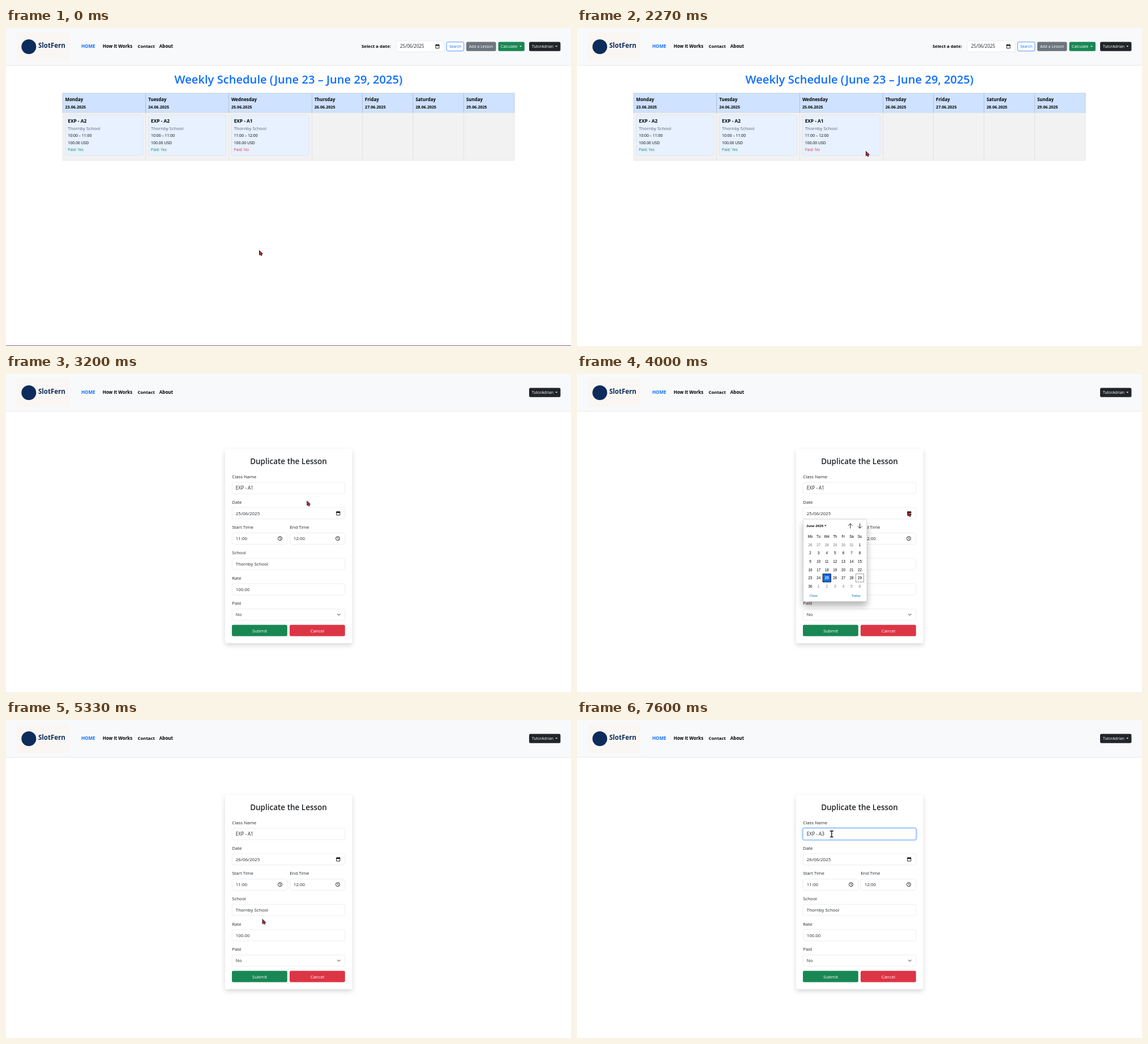
An HTML page that plays this animation: 998 px wide and 561 px high, repeating every 8000 ms.

```html
<!DOCTYPE html>
<html lang="en">
<head>
<meta charset="utf-8">
<title>Weekly schedule</title>
<style>
html, body { margin: 0; width: 100%; height: 100%; overflow: hidden; background: #fff; }
svg { display: block; width: 100%; height: 100%; }
text { font-family: "Open Sans", "Noto Sans", sans-serif; fill: #212529; white-space: pre; }
.b { font-weight: 700; }
.sb { font-weight: 600; }
.black { fill: #000; }
.white { fill: #fff; }
.blue { fill: #0d6efd; }
.grey { fill: #5a626b; }
.green { fill: #198754; }
.red { fill: #dc3545; }
.mid { text-anchor: middle; }
.field { fill: #fff; stroke: #dee2e6; stroke-width: .6; }
.icon { fill: none; stroke: #111; stroke-width: .9; }
#card { filter: drop-shadow(0 4.2px 4.2px rgba(0, 0, 0, .15)); }
#picker text { font-family: "Liberation Sans", Arial, sans-serif; }
#picker .out { fill: #777; }
#picker .link { fill: #0072d0; }
#panel { filter: drop-shadow(0 8px 6px rgba(0, 0, 0, .28)); }
#hint rect { filter: drop-shadow(0 .6px 1px rgba(0, 0, 0, .25)); }

.step { animation: 8s step-end infinite; }
.flow { animation: 8s linear infinite; }

#week, #tools { animation-name: week; }
@keyframes week { 0% { opacity: 1 } 32.44%, 100% { opacity: 0 } }
#edge { animation-name: edge; }
@keyframes edge { 0% { opacity: 1 } 15.81%, 100% { opacity: 0 } }
#menu { animation-name: menu; }
@keyframes menu { 0% { opacity: 0 } 15.81% { opacity: 1 } 28.31%, 100% { opacity: 0 } }
#pick { animation-name: pick; }
@keyframes pick { 0% { opacity: 0 } 19.5%, 100% { opacity: 1 } }

/* the page first lays out without the logo, then drops into place */
#form { animation-name: form; }
@keyframes form {
  0% { opacity: 0 }
  32.44% { opacity: 1; transform: translateY(-35.8px) }
  33.31%, 100% { opacity: 1; transform: none }
}
#bar { animation-name: bar; }
@keyframes bar { 0% { transform: none } 32.44% { transform: translateY(-35.8px) } 33.31%, 100% { transform: none } }
#links { animation-name: links; }
@keyframes links { 0% { transform: none } 32.44% { transform: translateY(-17.8px) } 33.31%, 100% { transform: none } }
#logo { animation-name: logo; }
@keyframes logo { 0% { opacity: 1 } 32.44% { opacity: 0 } 33.31%, 100% { opacity: 1 } }

#picker { animation-name: picker; }
@keyframes picker { 0% { opacity: 0 } 49.94% { opacity: 1 } 64.94%, 100% { opacity: 0 } }
#hover { animation-name: hover; }
@keyframes hover { 0% { opacity: 0 } 59% { opacity: 1 } 65%, 100% { opacity: 0 } }
#day1 { animation-name: before; }
#day2 { animation-name: after; }
@keyframes before { 0% { opacity: 1 } 64.94%, 100% { opacity: 0 } }
@keyframes after { 0% { opacity: 0 } 64.94%, 100% { opacity: 1 } }

#focus { animation-name: focus; }
@keyframes focus { 0%, 73.25% { opacity: 0 } 75%, 100% { opacity: 1 } }
#name1 { animation-name: name1; }
#name2 { animation-name: name2; }
#name3 { animation-name: name3; }
@keyframes name1 { 0% { opacity: 1 } 84.06%, 100% { opacity: 0 } }
@keyframes name2 { 0% { opacity: 0 } 84.06% { opacity: 1 } 88.31%, 100% { opacity: 0 } }
@keyframes name3 { 0% { opacity: 0 } 88.31%, 100% { opacity: 1 } }
#caret { animation-name: caret; }
@keyframes caret {
  0% { opacity: 0; transform: none }
  74.1% { opacity: 1; transform: none }
  80.8% { opacity: 0; transform: none }
  84.06% { opacity: 1; transform: translateX(-4.8px) }
  88.31% { opacity: 1; transform: none }
  94.94%, 100% { opacity: 0; transform: none }
}
#hint { animation-name: hint; }
@keyframes hint { 0%, 84.9% { opacity: 0 } 86.5%, 88.3% { opacity: 1 } 90.8%, 100% { opacity: 0 } }

#cursor { animation-name: move; }
@keyframes move {
  0% { transform: translate(447px, 392px); animation-timing-function: cubic-bezier(.35, .1, .45, 1) }
  10.875% { transform: translate(473px, 212px) }
  12.5% { transform: translate(471px, 204px) }
  14.125% { transform: translate(471px, 197px) }
  15% { transform: translate(471px, 197px); animation-timing-function: ease-in-out }
  21.625% { transform: translate(504px, 221.5px) }
  22.5% { transform: translate(504px, 221.5px); animation-timing-function: ease-out }
  25.875% { transform: translate(510px, 217px) }
  37.5% { transform: translate(510px, 217px); animation-timing-function: ease-in-out }
  44.125% { transform: translate(581px, 238.5px) }
  45% { transform: translate(581px, 238.5px) }
  46.625% { transform: translate(584px, 242px) }
  52.5% { transform: translate(584px, 242px); animation-timing-function: ease-in-out }
  60% { transform: translate(452.5px, 356px) }
  65.5% { transform: translate(452.5px, 356px) }
  66.625% { transform: translate(452.5px, 351px) }
  67.5% { transform: translate(452px, 338px) }
  68.375% { transform: translate(452px, 316px) }
  69.125% { transform: translate(452px, 290px) }
  70% { transform: translate(451px, 262px) }
  70.875% { transform: translate(451px, 238px) }
  71.625% { transform: translate(450px, 220px) }
  72.5% { transform: translate(450px, 208px) }
  73.375% { transform: translate(449.8px, 203px) }
  74.125%, 100% { transform: translate(449.8px, 201px) }
}
#arrow { animation-name: arrow; }
#beam { animation-name: beam; }
@keyframes arrow { 0% { opacity: 1 } 67.03% { opacity: 0 } 68.04% { opacity: 1 } 72.29%, 100% { opacity: 0 } }
@keyframes beam { 0% { opacity: 0 } 67.03% { opacity: 1 } 68.04% { opacity: 0 } 72.29%, 100% { opacity: 1 } }
</style>
</head>
<body>
<svg id="stage" viewBox="0 0 998 561"></svg>
<script>
// y is the middle of the capital letters
const text = (x, y, size, str, cls = '', extra = '') =>
  `<text x="${x}" y="${(y + size * .357).toFixed(2)}" font-size="${size}" class="${cls}" ${extra}>${str}</text>`;
const rect = (x, y, w, h, attrs = '') =>
  `<rect x="${x}" y="${y}" width="${w}" height="${h}" ${attrs}/>`;
const group = (id, kind, body) => `<g id="${id}" class="${kind}">${body}</g>`;
const field = (x, y, w, h = 19.8) => rect(x, y, w, h, 'rx="3" class="field"');
const triangle = (x, y, fill) => `<path d="M${x - 2} ${y - 1}h4l-2 2.1z" fill="${fill}"/>`;
const dateIcon = (x, y) =>
  `<path class="icon" d="M${x - 3} ${y - 2.7}h6v5.8h-6z"/>` +
  `<path d="M${x - 3.4} ${y - 3.2}h6.8v2.2h-6.8zM${x - 2.4} ${y - 4}h1v1h-1zM${x + 1.4} ${y - 4}h1v1h-1z" fill="#111"/>`;
const clockIcon = (x, y) =>
  `<circle cx="${x}" cy="${y}" r="3.5" class="icon"/><path class="icon" d="M${x} ${y - 2.2}v2.4l1.7 1"/>`;
const button = (x, y, w, h, fill, size, label, cx = x + w / 2) =>
  rect(x, y, w, h, `rx="2.5" fill="${fill}"`) + text(cx, y + h / 2 + .2, size, label, 'mid white');

function navbar() {
  const bar = rect(0, -40, 998, 105.6, 'fill="#f8f9fb"') + rect(0, 65.5, 998, .9, 'fill="#e2e5e8"');
  const logo = rect(19, 7, 93, 51, 'fill="#faf6f3"') +
    '<circle cx="40.3" cy="33" r="13" fill="#0d2c5c"/>' +
    text(57, 31, 11.5, 'SlotFern', 'b', 'style="fill:#0d2c5c"');
  const links = text(133, 32.5, 8, 'HOME', 'b blue') +
    text(170.7, 32.5, 7.9, 'How It Works', 'b black') +
    text(232.5, 32.5, 7.8, 'Contact', 'b black') +
    text(270.8, 32.5, 8, 'About', 'b black') +
    button(924, 24.4, 55.4, 16.3, '#212529', 6.85, 'TutorAdrian', 948) +
    triangle(972.2, 32.4, '#fff');
  const tools = text(628, 32.5, 7.82, 'Select a date:', 'b black') +
    field(689.2, 22.8, 84.6, 19.2) +
    text(696, 32.5, 8.05, '25/06/2025') + dateIcon(762, 32.6) +
    rect(778.3, 24.7, 30.4, 15.9, 'rx="2.5" fill="#fff" stroke="#0d6efd" stroke-width=".7"') +
    text(793.5, 32.9, 6.75, 'Search', 'mid blue') +
    button(813, 24.4, 52.5, 16.3, '#6c757d', 6.87, 'Add a Lesson') +
    button(869.5, 24.4, 46.4, 16.3, '#198754', 6.9, 'Calculate', 888.7) +
    triangle(909, 32.4, '#fff');
  return group('bar', 'step', bar) + group('logo', 'step', logo) +
    group('links', 'step', links) + group('tools', 'step', tools);
}

function week() {
  const cols = [100, 246.8, 393.4, 540.3, 629.6, 719, 808.5, 898];
  const days = ['Monday', 'Tuesday', 'Wednesday', 'Thursday', 'Friday', 'Saturday', 'Sunday'];
  const lessons = [['A2', '10:00 – 11:00', 'Yes'], ['A2', '10:00 – 11:00', 'Yes'], ['A1', '11:00 – 12:00', 'No']];
  let out = text(499, 91, 20.15, 'Weekly Schedule (June 23 – June 29, 2025)', 'sb mid blue');
  days.forEach((day, i) => {
    const x = cols[i], w = cols[i + 1] - x;
    out += rect(x, 115, w, 34.2, 'fill="#cfe2ff" stroke="#a6b5cc" stroke-width=".6"') +
      rect(x, 149.4, w, 84.1, 'fill="#f2f2f2" stroke="#dcdee0" stroke-width=".6"') +
      text(x + 4.5, 126.2, 7.9, day, 'b black') +
      text(x + 4.5, 139, 7.15, `${23 + i}.06.2025`, 'b black');
  });
  lessons.forEach(([room, hours, paid], i) => {
    const x = cols[i] + 9.3;
    out += rect(x - 4.5, 153.3, 137.2, 71.5, 'rx="3" fill="#e7f1ff" stroke="#d3dcea" stroke-width=".6"') +
      text(x, 164.4, 8.3, 'EXP - ' + room, 'b black') +
      text(x, 177, 7.9, 'Thornby School', 'grey') +
      text(x, 189.6, 6.87, hours, 'black') +
      text(x, 202.2, 6.87, '100.00 USD', 'black') +
      text(x, 214.6, 6.75, 'Paid: ' + paid, paid === 'Yes' ? 'green' : 'red');
  });
  return group('week', 'step', out);
}

function menu() {
  const row = i => 197.6 + 16.6 * i;
  const items = ['Edit', 'Duplicate', 'Mark Paid', 'Delete', 'Close'];
  return group('menu', 'step',
    rect(470.4, 197.4, 57.2, 83.4, 'rx="2.5" fill="#fff" stroke="#ccc" stroke-width=".6"') +
    group('pick', 'step', rect(470.8, row(1), 56.4, 16.6, 'fill="#eef0f2"')) +
    items.map((s, i) => text(478.8, row(i) + 8.2, 7.9, s)).join(''));
}

function form() {
  const top = i => 191.2 + 44.68 * i;
  const mid = i => top(i) + 10;
  const labels = ['Class Name', 'Date', 'Start Time', 'School', 'Rate', 'Paid'];
  let out = rect(387, 132, 224.5, 342.8, 'id="card" rx="2.5" fill="#fff"') +
    text(499, 154, 13.5, 'Duplicate the Lesson', 'sb mid');
  labels.forEach((s, i) => {
    out += text(399.2, top(i) - 10, 7.9, s);
    out += i === 2 ? field(399.3, top(2), 97.4) + field(501.3, top(2), 97.4) : field(399.3, top(i), 199.4);
  });
  out += text(501.2, top(2) - 10, 7.9, 'End Time') +
    group('focus', 'flow',
      rect(398, top(0) - 1.2, 202, 22.2, 'rx="4" fill="none" stroke="#0d6efd" stroke-opacity=".28" stroke-width="2.1"') +
      rect(399.3, top(0), 199.4, 19.8, 'rx="3" fill="#fff" stroke="#86b7fe" stroke-width=".7"'));
  ['EXP - A1', 'EXP - A', 'EXP - A3'].forEach((s, i) => {
    out += group('name' + (i + 1), 'step', text(405.8, mid(0), 8.25, s));
  });
  out += rect(437.2, 195.4, .7, 10.8, 'id="caret" class="step"') +
    group('day1', 'step', text(405.8, mid(1), 8, '25/06/2025')) +
    group('day2', 'step', text(405.8, mid(1), 8, '26/06/2025')) +
    dateIcon(586.8, mid(1)) +
    text(405.8, mid(2), 7.9, '11:00') + clockIcon(484, mid(2) - .4) +
    text(507.8, mid(2), 7.9, '12:00') + clockIcon(586, mid(2) - .4) +
    text(405.8, mid(3), 7.9, 'Thornby School') +
    text(405.8, mid(4), 7.87, '100.00') +
    text(405.8, mid(5), 7.9, 'No') +
    `<path class="icon" d="M585.2 ${mid(5) - 1.5}l2.7 2.7 2.7-2.7"/>` +
    button(399, 442.6, 97.8, 19.8, '#198754', 7.87, 'Submit') +
    button(501, 442.6, 97.8, 19.8, '#dc3545', 7.87, 'Cancel');
  return group('form', 'step', out);
}

function picker() {
  const colX = i => 412.1 + 14.58 * i, rowY = r => 301.6 + 14.56 * r;
  const cell = (i, r, attrs) => rect(colX(i) - 7.1, rowY(r) - 7.1, 14.2, 14.2, attrs);
  let out = rect(399.6, 256.2, 112.4, 145, 'id="panel" rx="3" fill="#fff" stroke="#bbb" stroke-width=".5"') +
    text(405, 267.4, 6.24, 'June 2025', 'b black') + triangle(438.8, 267.4, '#111') +
    '<path class="icon" d="M482.8 272.3v-8.4m-3.7 3.7 3.7-3.7 3.7 3.7M499.6 263.7v8.4m-3.7-3.7 3.7 3.7 3.7-3.7"/>' +
    group('hover', 'step', cell(3, 4, 'fill="#e4e4e4"')) +
    cell(2, 4, 'fill="#0d6efd" stroke="#111" stroke-width="1"') +
    cell(6, 4, 'fill="none" stroke="#777" stroke-width=".7"');
  'Mo Tu We Th Fr Sa Su'.split(' ').forEach((s, i) => { out += text(colX(i), 286.8, 6.3, s, 'mid black'); });
  for (let n = 0; n < 42; n++) {
    const date = new Date(2025, 4, 26 + n), day = date.getDate(), inside = date.getMonth() === 5;
    const cls = !inside ? 'out' : day === 25 ? 'b white' : 'black';
    out += text(colX(n % 7), rowY(Math.floor(n / 7)), 6.3, day, 'mid ' + cls);
  }
  out += text(410.7, 390.5, 6.1, 'Clear', 'link') + text(484.7, 390.5, 6.1, 'Today', 'link');
  return group('picker', 'step', out);
}

function hint() {
  return group('hint', 'flow', rect(433.4, 212.8, 98.6, 21.4, 'rx="2.5" fill="#fff"') +
    text(441.5, 223.5, 7, 'EXP - A2'));
}

function cursor() {
  return group('cursor', 'flow',
    '<path id="arrow" class="step" d="M.5.6V8.6L2.3 7.1 3.6 9.7 5.1 9 3.9 6.4H6.4z" fill="#d3202c" stroke="#111" stroke-width=".85" stroke-linejoin="round"/>' +
    '<path id="beam" class="step" d="M-3-5.2h2.2L0-4.6.8-5.2H3M-3 5.4h2.2L0 4.8.8 5.4H3M0-5V5.2" fill="none" stroke="#000" stroke-width="1.4"/>');
}

document.getElementById('stage').innerHTML =
  navbar() + week() + menu() + form() + picker() + hint() +
  rect(0, 560, 998, 1, 'id="edge" class="step" fill="#8c6094"') + cursor();
</script>
</body>
</html>
```
